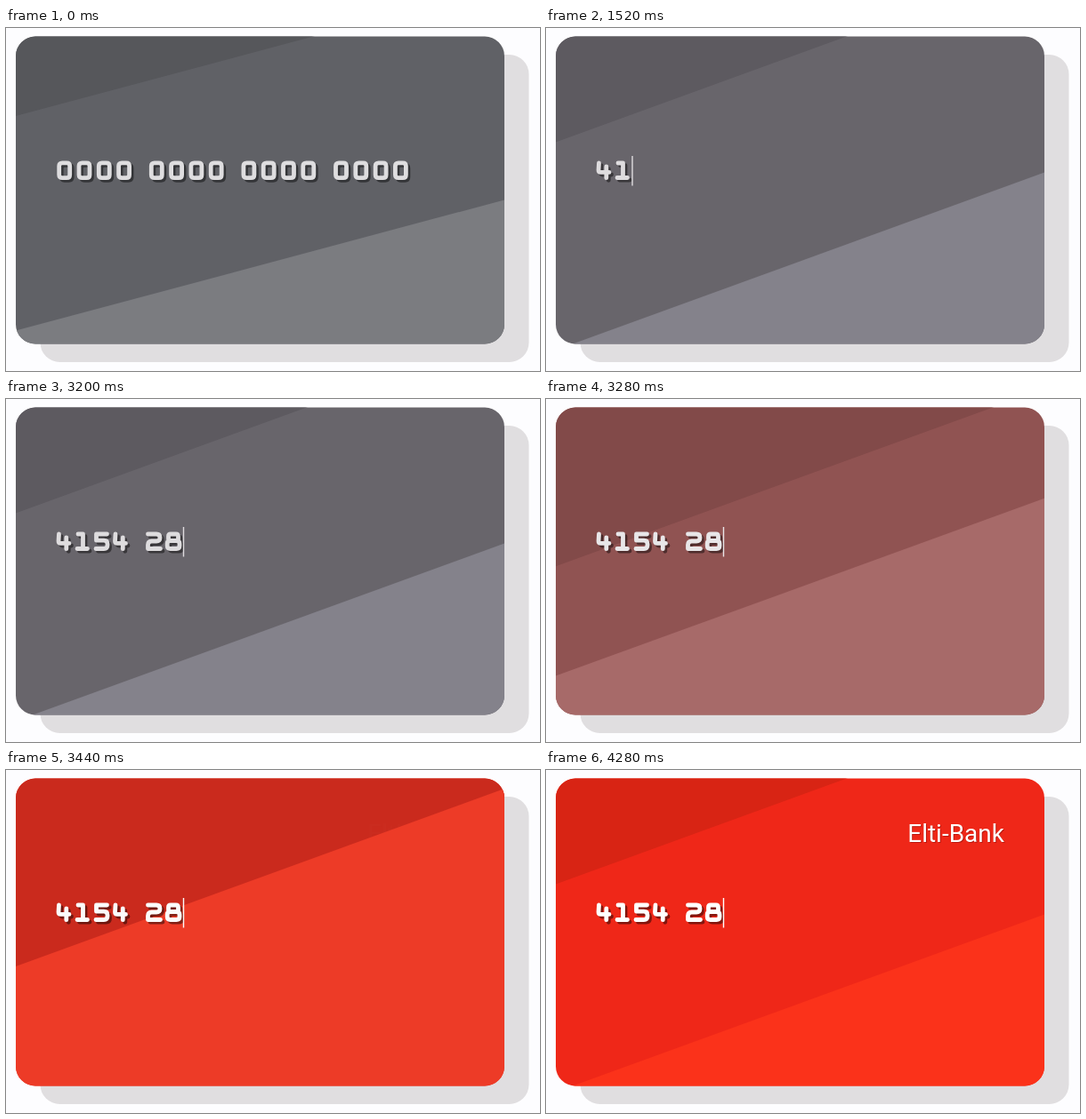
An HTML page that plays this animation: 600x386 px, repeating every 4.36 s.

```html
<!DOCTYPE html>
<html lang="en">
<head>
<meta charset="utf-8">
<title>Card number input</title>
<style>
  html, body { margin: 0; width: 100%; height: 100%; overflow: hidden; background: #fdfdff; }
  svg { display: block; width: 600px; height: 386px; }
  .name { font: 400 28px Roboto, sans-serif; text-anchor: end; }
  .digits { fill: none; stroke-width: 4.8; stroke-linecap: round; stroke-linejoin: round; }
</style>
</head>
<body>
<svg viewBox="0 0 600 386" aria-label="Bank card">
  <defs>
    <clipPath id="cardShape"><rect x="11" y="9.5" width="549" height="346" rx="22"/></clipPath>
    <clipPath id="underLight"><polygon id="lightClip"/></clipPath>
    <g id="ink"></g>
  </defs>
  <rect x="38.5" y="30" width="549" height="346" rx="22" fill="#e0dee0"/>
  <g clip-path="url(#cardShape)">
    <rect id="mid" width="600" height="386"/>
    <polygon id="dark"/>
    <g id="name" class="name">
      <text x="516" y="82" fill="#500" fill-opacity=".35">Elti-Bank</text>
      <text x="515" y="81" fill="#fff">Elti-Bank</text>
    </g>
    <polygon id="light"/>
    <g clip-path="url(#underLight)">
      <text id="ghost" class="name" x="515" y="81" fill="#784646" fill-opacity=".25">Elti-Bank</text>
    </g>
  </g>
  <g class="digits">
    <use href="#ink" x="2.5" y="2.6" stroke="#000" stroke-opacity=".45"/>
    <use id="face" href="#ink"/>
  </g>
  <rect id="caret" y="144" width="1.4" height="33.5"/>
</svg>
<script>
const LOOP = 4360, BLINK = 480, CENTER_X = 285.5;
const el = id => document.getElementById(id);

// Digit strokes, relative to the left end and top of each character cell
const GLYPHS = {
  0: 'M6.8 2.8H11.8Q15.3 2.8 15.3 6.3V16.2Q15.3 19.7 11.8 19.7H6.8Q3.3 19.7 3.3 16.2V6.3Q3.3 2.8 6.8 2.8Z',
  1: 'M4 3H9.5V19.5M3 19.5H14.5',
  2: 'M3.5 3H13Q17 3 17 7T13 11H7.5Q3.5 11 3.5 15V19.5H17.5',
  4: 'M4 3L3.5 11Q3.4 13.4 5.8 13.4H15.5M12.3 7V19.7',
  5: 'M16.5 3H4.5V10.2H13Q17 10.2 17 14.2V15.5Q17 19.5 13 19.5H4',
  8: 'M7 3H13Q15.5 3 15.5 5.5V8.2Q15.5 10.5 13 10.5H7Q4.5 10.5 4.5 8.2V5.5Q4.5 3 7 3ZM6.5 10.5H13.5Q17 10.5 17 13.8V16.3Q17 19.5 13.5 19.5H6.5Q3.2 19.5 3.2 16.3V13.8Q3.2 10.5 6.5 10.5Z'
};

// time, typed digit, its left end, caret position
const KEYS = [
  [160, '', 0, 56], [1320, 4, 55.5, 77], [1520, 1, 77, 97], [2280, 5, 97, 119],
  [2520, 4, 119, 141], [2800, 2, 156, 178], [3200, 8, 178, 199.5]
];

const PALETTES = {
  idle:   { dark: [86, 87, 91],  mid: [96, 97, 102],   light: [123, 124, 128], text: [222, 221, 223] },
  active: { dark: [93, 90, 96],  mid: [104, 101, 107], light: [132, 130, 139], text: [222, 220, 222] },
  bank:   { dark: [216, 36, 20], mid: [239, 39, 24],   light: [251, 50, 26],   text: [255, 255, 255] }
};

const mix = (a, b, p) => a + (b - a) * p;
const span = (t, from, to) => Math.min(1, Math.max(0, (t - from) / (to - from)));
const ease = p => p * p * (3 - 2 * p);

function addDigit(digit, x) {
  const path = document.createElementNS('http://www.w3.org/2000/svg', 'path');
  path.setAttribute('d', GLYPHS[digit]);
  path.setAttribute('transform', `translate(${x} 149)`);
  return el('ink').appendChild(path);
}

const placeholder = Array.from({ length: 16 }, (_, i) =>
  addDigit(0, 56.4 + Math.floor(i / 4) * 103.6 + (i % 4) * 22.3));
const typed = KEYS.slice(1).map(([time, digit, x]) => ({ time, path: addDigit(digit, x) }));

function colour(part, t) {
  const focus = ease(span(t, 100, 480)), tint = span(t, 3200, 3472);
  const rgb = PALETTES.idle[part].map((v, i) =>
    mix(mix(v, PALETTES.active[part][i], focus), PALETTES.bank[part][i], tint));
  return `rgb(${rgb.map(Math.round)})`;
}

// Half plane above (y = 0) or below (y = 386) a slanted edge
function halfPlane(edgeY, slope, y) {
  const at = x => edgeY - slope * (x - CENTER_X);
  return `0,${y} 600,${y} 600,${at(600)} 0,${at(0)}`;
}

function drawBands(t) {
  const focus = ease(span(t, 100, 480));
  const closed = ease(span(t, 3200, 3400)) - ease(span(t, 3500, 3880));
  const slope = Math.tan(mix(15, 20, focus) * Math.PI / 180);
  const darkY = mix(mix(25.5, 28.5, focus), 195, closed);
  const lightY = mix(mix(267, 262.5, focus), 121, closed);
  const lower = halfPlane(lightY, slope, 386);
  el('dark').setAttribute('points', halfPlane(darkY, slope, 0));
  el('light').setAttribute('points', lower);
  el('lightClip').setAttribute('points', lower);
  for (const part of ['dark', 'mid', 'light']) el(part).setAttribute('fill', colour(part, t));
}

function drawNumber(t) {
  const show = (path, on) => path.setAttribute('display', on ? 'inline' : 'none');
  placeholder.forEach(path => show(path, t < KEYS[1][0]));
  typed.forEach(({ time, path }) => show(path, t >= time));
  const ink = colour('text', t), caret = el('caret');
  el('face').setAttribute('stroke', ink);
  caret.setAttribute('fill', ink);
  const key = KEYS.filter(k => t >= k[0]).pop();
  const lit = key && Math.floor((t - key[0]) / BLINK) % 2 === 0;
  show(caret, lit);
  if (key) caret.setAttribute('x', key[3] - 0.7);
}

function render(t) {
  drawBands(t);
  drawNumber(t);
  const fade = span(t, 3440, 3600);
  el('name').setAttribute('opacity', fade);
  el('ghost').setAttribute('opacity', fade);
}

const start = performance.now();
function tick() {
  render((performance.now() - start) % LOOP);
  requestAnimationFrame(tick);
}
tick();
</script>
</body>
</html>
```
